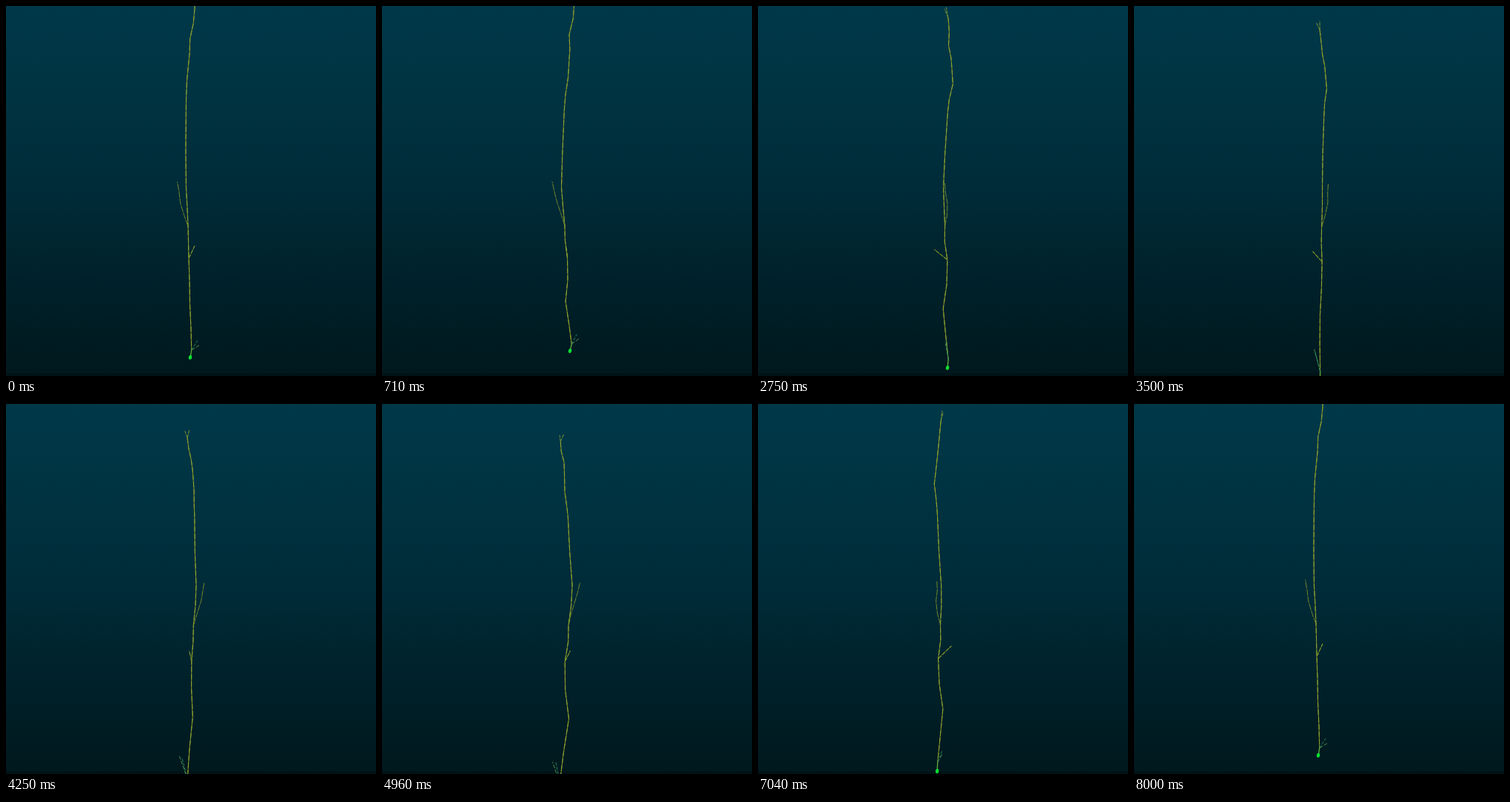
An HTML page with a canvas for the animation above (8.04 s loop, 500x500 px).

```html
<!DOCTYPE html>
<html lang="en">
<head>
<meta charset="utf-8">
<title>Rotating neuron</title>
<style>
  html, body { margin: 0; width: 100%; height: 100%; overflow: hidden; background: #002835; }
  canvas { display: block; width: 100vw; height: 100vh; }
</style>
</head>
<body>
<canvas id="stage" width="500" height="500"></canvas>
<script>
const ctx = document.getElementById('stage').getContext('2d');
const LOOP = 8040, TURN = 8000, STEPS = 192;
const LEAN = 47 * Math.PI / 180;

// Node: x centre, x cosine, x sine, y centre [, y cosine, y sine]
const trunk = [
  [251, 4, 10, 23],
  [251, 2.2, 10.4, 40],
  [250.2, -1.5, 7.8, 58],
  [251.1, -3, 10, 75],
  [250.5, -6, 11.5, 108],
  [249.6, -6, 6.6, 128],
  [249.5, -6.2, 4.1, 145],
  [249.2, -6.3, 0, 200],
  [249.9, -6.5, -3.6, 245],
  [250.3, -5.4, -2.1, 272],
  [249.8, -3.8, 0.8, 298],
  [249.8, -3.3, 0.8, 319],
  [249.5, -2.5, 6, 344],
  [249.8, -1.8, 5.1, 378],
  [250.3, -1.8, -1.3, 412],
  [249.5, 0.5, 5.4, 450],
  [249, 1.7, 11, 484]
];
const soma = [248.3, 0.7, 9.8, 496];
const fork = trunk[0], upper = trunk[10], lower = trunk[12], base = trunk[16];

const forkTips = [[250, 7, 7, 11], [251, 2.3, 5.5, 9]];
const longBranch = [
  upper,
  [249.6, -9, 1, 283],
  [249.6, -14, -1.7, 266],
  [249.6, -15.6, -6, 252],
  [249.2, -17.7, -8, 239, -1.5, -1]
];
const shortBranch = [lower, [250.2, 4.8, -11.3, 328.5, -4.5, -2.5]];
const dendriteTips = [
  [249.5, 12.5, 14.5, 465, -7, -20],
  [249.3, 9.7, 10.7, 463, -11, -19]
];

const sky = ctx.createLinearGradient(0, 0, 0, 500);
[[0, '#003849'], [0.25, '#003341'], [0.5, '#002b38'], [0.75, '#00212a'], [1, '#00181d']]
  .forEach(([at, color]) => sky.addColorStop(at, color));

function project([x, xc, xs, y, yc, ys], angle) {
  const c = Math.cos(angle), s = Math.sin(angle);
  // Perspective shift grows towards both ends of the leaning cell.
  const dy = yc === undefined
    ? -0.00053 * (y - 250) * (y - 258) * Math.cos(angle - LEAN)
    : yc * c + ys * s;
  return [x + xc * c + xs * s, y + dy];
}

function line(nodes, angle, color, width = 1, dash = []) {
  ctx.beginPath();
  nodes.forEach(n => ctx.lineTo(...project(n, angle)));
  ctx.strokeStyle = color;
  ctx.lineWidth = width;
  ctx.setLineDash(dash);
  ctx.stroke();
}

function draw(angle) {
  ctx.fillStyle = sky;
  ctx.fillRect(0, 0, 500, 500);
  ctx.fillStyle = '#001317';
  ctx.fillRect(0, 496, 500, 4);

  line(longBranch, angle, '#71872c', 1, [9, 1]);
  line(shortBranch, angle, '#8ea226', 1.1, [6, 1]);
  forkTips.forEach(tip => line([fork, tip], angle, '#7d9434', 1, [5, 1]));
  line(trunk, angle, '#74872f', 1.1);
  line(trunk, angle, '#93a72b', 1, [7, 3]);

  line([base, dendriteTips[0]], angle, '#4f9048', 1, [5, 2]);
  line([base, dendriteTips[1]], angle, '#258a60', 1, [4, 2]);
  line([base, soma], angle, '#5fae3c', 1.3);

  const [x, y] = project(soma, angle);
  ctx.beginPath();
  ctx.ellipse(x, y, 2.2, 3, 0.15, 0, 2 * Math.PI);
  ctx.fillStyle = '#0be032';
  ctx.fill();
}

function tick(now) {
  const t = now % LOOP;
  const step = Math.floor((t + 5) * STEPS / TURN);
  draw(2 * Math.PI * step / STEPS);
  requestAnimationFrame(tick);
}
tick(0);
</script>
</body>
</html>
```
